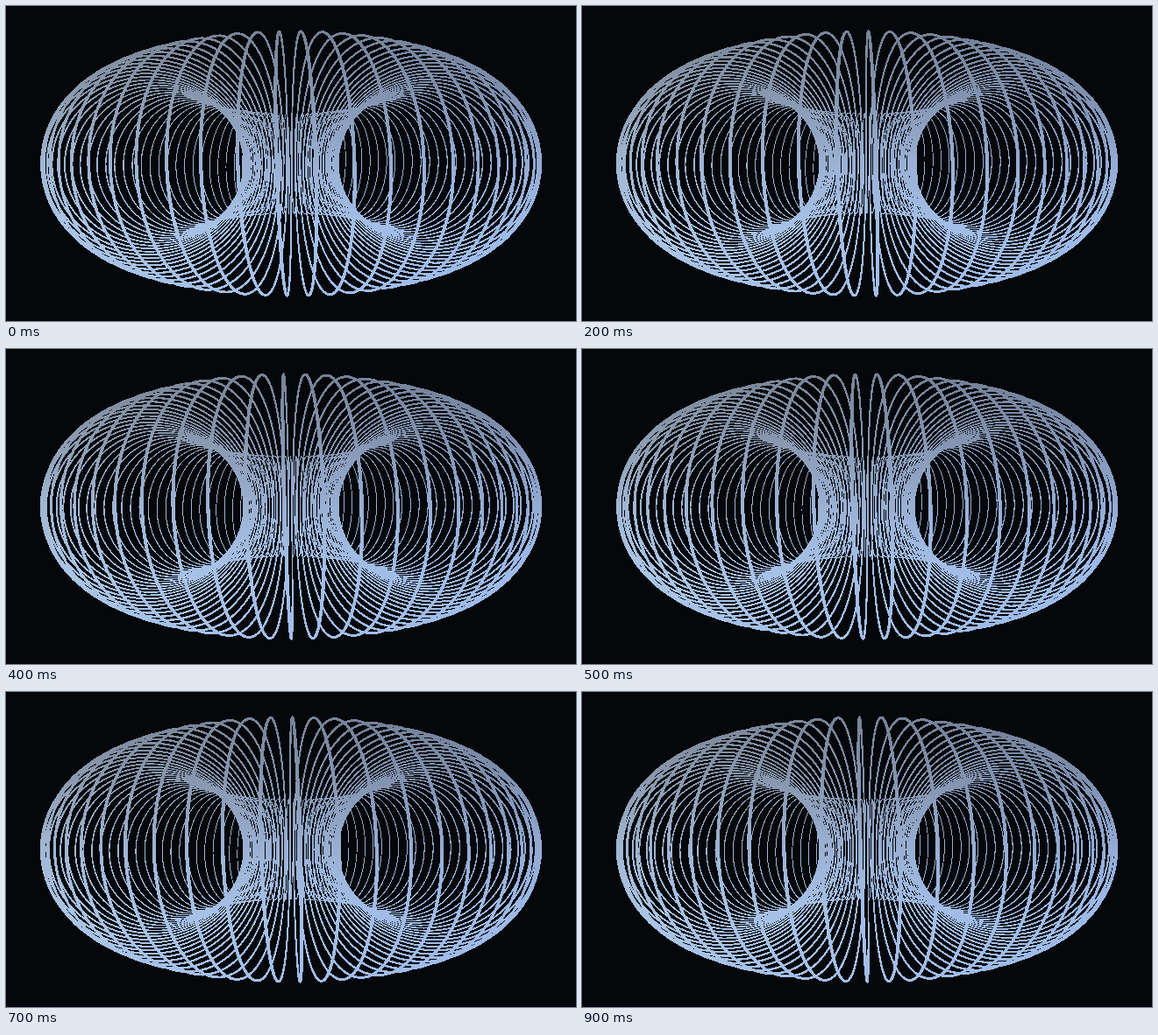
Animation, 650 px wide and 360 px high, one loop 1 s. Source, as an HTML page with a canvas:

```html
<!DOCTYPE html>
<html lang="en">
<head>
<meta charset="utf-8">
<title>Turning toroidal coil</title>
<style>
  html, body { margin: 0; width: 100%; height: 100%; overflow: hidden; background: #05070b; }
  canvas { display: block; width: 650px; height: 360px; image-rendering: pixelated; }
</style>
</head>
<body>
<canvas id="stage" width="650" height="360"></canvas>
<script>
const W = 650, H = 360;
const RING = 5, TUBE = 3, WIRE = 0.027;   // torus radii and wire radius
const CAMERA = 12, FOCAL = 318.6;
const TURNS = 89, STEPS = 80;             // windings, segments per winding
const START = 229 * Math.PI / 180;
const TAU = 2 * Math.PI;
const STEP_MS = 100, STEPS_PER_TURN = 5;

const BACK = [5, 7, 11];
// Wire shade by height: [y, r, g, b]
const SHADES = [
  [28, 118, 131, 151],
  [100, 133, 149, 175],
  [180, 154, 177, 212],
  [250, 164, 191, 230],
  [332, 162, 190, 232]
];

const ctx = document.getElementById("stage").getContext("2d");
const image = ctx.createImageData(W, H);
const pixels = image.data;

function shadeAt(y) {
  let i = 1;
  while (i < SHADES.length - 1 && y > SHADES[i][0]) i++;
  const a = SHADES[i - 1], b = SHADES[i];
  const k = Math.min(1, Math.max(0, (y - a[0]) / (b[0] - a[0])));
  return [1, 2, 3].map(c => a[c] + (b[c] - a[c]) * k);
}
const rows = Array.from({ length: H }, (_, y) => shadeAt(y));

function plot(x, y, rgb) {
  const i = (y * W + x) * 4;
  const side = (W / 2 - x) / W * 16;      // slightly warmer on the left
  pixels[i] = rgb[0] + side;
  pixels[i + 1] = rgb[1] + side * 0.8;
  pixels[i + 2] = rgb[2] - side * 0.2;
}

function clear() {
  for (let i = 0; i < pixels.length; i += 4) {
    pixels[i] = BACK[0];
    pixels[i + 1] = BACK[1];
    pixels[i + 2] = BACK[2];
    pixels[i + 3] = 255;
  }
}

// Projects the point of the coil at winding angle t
function project(t, phase) {
  const p = (phase - t) / TURNS;
  const rho = RING + TUBE * Math.cos(t);
  const scale = FOCAL / (CAMERA - rho * Math.cos(p));
  return {
    x: W / 2 + rho * Math.sin(p) * scale,
    y: H / 2 - TUBE * Math.sin(t) * scale,
    r: WIRE * scale
  };
}

// Fills every pixel whose centre lies on the wire, with hard edges
function segment(a, b) {
  const r = (a.r + b.r) / 2, dx = b.x - a.x, dy = b.y - a.y;
  const len2 = dx * dx + dy * dy || 1e-9;
  const x0 = Math.ceil(Math.min(a.x, b.x) - r - 0.5);
  const x1 = Math.floor(Math.max(a.x, b.x) + r - 0.5);
  const y0 = Math.ceil(Math.min(a.y, b.y) - r - 0.5);
  const y1 = Math.floor(Math.max(a.y, b.y) + r - 0.5);
  for (let y = y0; y <= y1; y++) {
    for (let x = x0; x <= x1; x++) {
      const px = x + 0.5 - a.x, py = y + 0.5 - a.y;
      const k = Math.min(1, Math.max(0, (px * dx + py * dy) / len2));
      const ex = px - k * dx, ey = py - k * dy;
      if (ex * ex + ey * ey <= r * r) plot(x, y, rows[y]);
    }
  }
}

function draw(step) {
  const phase = START - TAU * step / STEPS_PER_TURN;
  clear();
  let last = project(0, phase);
  for (let i = 1; i <= TURNS * STEPS; i++) {
    const next = project(i / STEPS * TAU, phase);
    segment(last, next);
    last = next;
  }
  ctx.putImageData(image, 0, 0);
}

let shown = -1;
const began = performance.now();
function tick() {
  const step = Math.floor((performance.now() - began) / STEP_MS) % STEPS_PER_TURN;
  if (step !== shown) draw(shown = step);
  requestAnimationFrame(tick);
}
tick();
</script>
</body>
</html>
```
